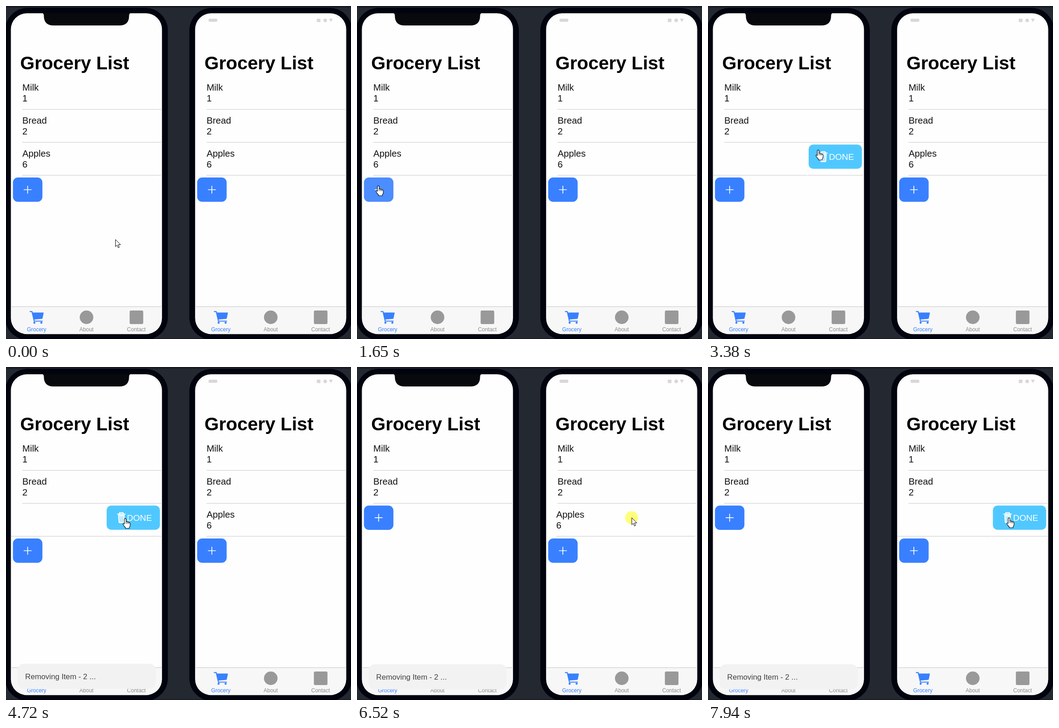
These frames come from a looping animation (761x736 px, 8000 ms). An HTML page with a canvas:

```html
<!DOCTYPE html>
<html lang="en">
<head>
<meta charset="utf-8">
<title>Grocery List</title>
<style>
html, body { margin: 0; width: 100%; height: 100%; overflow: hidden; background: #242830; }
canvas { display: block; }
</style>
</head>
<body>
<canvas id="stage" width="761" height="736"></canvas>
<script>
const ctx = document.getElementById('stage').getContext('2d');
const LOOP = 8000;
const RIGHT = 406.4;
const FONT = '"Liberation Sans", Arial, sans-serif';
const BLUE = '#3880ff', CYAN = '#50c8ff', GRAY = '#999', LINE = '#c8c7cc', PAPER = '#fefefe';
const ROW_TOP = 228, PITCH = 72.8, ADD_TOP = 379;
const OPEN = 123;
const TAP = 4150, TOAST = 4500, REMOVED = 4870;

// Pointer moves: from time, to time, goal x, goal y, bend of the path
const HOME = { x: 241, y: 516 };
const MOVES = [
  [70, 800, 88, 451, 50],
  [800, 1110, 47, 397, 0],
  [1680, 2030, 141, 318, -135],
  [2050, 2560, 220, 346, 0],
  [2660, 2910, 80, 340, 0],
  [3000, 3380, 243, 318, 0],
  [3400, 3770, 263, 334.5, 0],
  [4820, 5420, 202, 701, 0],
  [5590, 6350, 608.5, 333, 0],
  [6490, 6850, 470, 336, 0],
  [6930, 7380, 700, 316, 0],
  [7500, 7900, 664, 333, 0]
];
const DRAG_L = { press: 2610, release: 2990 };
const DRAG_R = { press: 6440, release: 6930 };

const clamp = v => Math.min(1, Math.max(0, v));
const smooth = k => k * k * (3 - 2 * k);

function pointerAt(t) {
  let { x, y } = HOME;
  for (const [from, to, gx, gy, bend] of MOVES) {
    if (t < from) break;
    const k = smooth(clamp((t - from) / (to - from)));
    x += (gx - x) * k;
    y += (gy - y) * k + bend * 4 * k * (1 - k);
  }
  return { x, y };
}

// The row follows the pointer, resists past the open width, then settles there
function swipe(t, { press, release }) {
  if (t < press) return 0;
  const pull = pointerAt(press).x - pointerAt(Math.min(t, release)).x;
  const over = Math.max(0, pull - OPEN) * 0.55;
  const settle = t > release ? Math.exp((release - t) / 60) : 1;
  return Math.min(pull, OPEN) + over * settle;
}

function over(p, x, y, w, h) {
  return p.x >= x && p.x <= x + w && p.y >= y && p.y <= y + h;
}

function rect(x, y, w, h, color) {
  ctx.fillStyle = color;
  ctx.fillRect(x, y, w, h);
}

function round(x, y, w, h, r, color) {
  ctx.beginPath();
  ctx.roundRect(x, y, w, h, r);
  ctx.fillStyle = color;
  ctx.fill();
}

function disc(x, y, r, color) {
  ctx.beginPath();
  ctx.arc(x, y, r, 0, Math.PI * 2);
  ctx.fillStyle = color;
  ctx.fill();
}

function text(str, x, y, size, color, align = 'left', weight = 'normal') {
  ctx.font = `${weight} ${size}px ${FONT}`;
  ctx.textAlign = align;
  ctx.fillStyle = color;
  ctx.fillText(str, x, y);
}

function path(d, fill, stroke, width = 1) {
  const p = new Path2D(d);
  if (fill) { ctx.fillStyle = fill; ctx.fill(p); }
  if (stroke) {
    ctx.strokeStyle = stroke;
    ctx.lineWidth = width;
    ctx.lineJoin = ctx.lineCap = 'round';
    ctx.stroke(p);
  }
}

function at(x, y, draw) {
  ctx.save();
  ctx.translate(x, y);
  draw();
  ctx.restore();
}

function row(name, count, index, shift = 0) {
  const y = ROW_TOP + index * PITCH;
  text(name, 36 - shift, y - 41, 20.3, '#111');
  text(count, 36 - shift, y - 17, 20.3, '#111');
  rect(36 - shift, y, 306, 1, LINE);
}

function trash() {
  path('M247.2 326.5H261.8L260.6 343Q260.4 345 258.5 345H250.5Q248.6 345 248.4 343Z', '#fff');
  path('M246 325H263M250.5 324.5V322H258.5V324.5', null, '#fff', 2);
  path('M251 329.5L251.6 342M254.5 329.5V342M258 329.5L257.4 342', null, CYAN, 1.2);
}

function swipeRow(shift) {
  if (shift > 4) {
    round(222, 306.3, 117.5, 53.5, 10, CYAN);
    trash();
    text('DONE', 266.7, 339.7, 19.1, '#fff');
    rect(12, ROW_TOP + 2 * PITCH, 330, 1, LINE);
  }
  rect(12, 302.5, Math.max(0, 331 - shift), 72.5, PAPER);
  row('Apples', '6', 2, shift);
}

function addButton(y, hover) {
  round(15.3, y, 65, 53.7, 11, hover ? '#4c8dff' : BLUE);
  path(`M39.7 ${y + 27}h16m-8-8v16`, null, '#fff', 1.7);
}

function cart() {
  path('M53 675.3H57.3L62.2 696.5H80', null, BLUE, 2.2);
  path('M58 677.6H82.2Q83.3 677.6 83 678.8L80.6 690.2Q80.3 691.3 79.2 691.5L61.4 693Z', BLUE);
  disc(62.6, 700, 2.3, BLUE);
  disc(78, 700, 2.3, BLUE);
}

function tabs() {
  rect(12, 664, 331, 62, '#f7f7f7');
  rect(12, 664, 331, 1, '#c4c4c6');
  cart();
  disc(177.6, 688, 15, GRAY);
  round(272.7, 673, 30, 30, 3, GRAY);
  ['Grocery', 'About', 'Contact'].forEach((name, i) =>
    text(name, 67.5 + i * 110, 718.7, 12, i ? '#8c8c8c' : BLUE, 'center'));
}

function toast(t) {
  if (t < TOAST) return;
  const q = clamp((t - TOAST) / 350) - 1;
  const ease = 1 + 1.75 * q ** 3 + 0.75 * q * q;
  const y = 657 + 70 * (1 - ease);
  round(25.5, y, 305, 55.5, 14, '#f2f2f2');
  text('Removing Item - 2 ...', 42.3, y + 33.7, 16.8, '#414141');
}

function notch() {
  path('M79 15.5Q83.5 16 83.5 21.5Q83.5 43 105 43H250Q271.5 43 271.5 21.5Q271.5 16 276 15.5Z', '#08090c');
}

function statusBar() {
  const c = '#d8d8d8';
  round(40.3, 28, 19.5, 7, 3, c);
  rect(279.2, 28, 8, 7.5, c);
  disc(297.6, 31.7, 4, c);
  path('M305.8 28H314.6L310.2 35.5Z', c);
}

function phone(x, { shift, removed, hover, toastAt = 0, top }) {
  at(x, 0, () => {
    round(-2, 4, 359, 734, 50, '#01040e');
    round(10.7, 16, 333.4, 709.3, 35.5, PAPER);
    ctx.save();
    ctx.clip();
    text('Grocery List', 31.3, 140, 40.8, '#000', 'left', 'bold');
    row('Milk', '1', 0);
    row('Bread', '2', 1);
    if (!removed) swipeRow(shift);
    addButton(ADD_TOP - (removed ? PITCH : 0), hover);

    // The app view sits in a slightly smaller rounded area
    ctx.beginPath();
    ctx.roundRect(12, 17, 330.5, 707.3, 38);
    ctx.strokeStyle = 'rgba(0,0,0,0.1)';
    ctx.lineWidth = 0.8;
    ctx.stroke();
    ctx.clip();
    tabs();
    toast(toastAt);
    ctx.restore();
    top();
  });
}

function arrow() {
  path('M.5 .5V15.8L4 12.5L6.4 18.3L8.9 17.3L6.5 11.6H11.3Z', '#fff', '#000', 1);
}

function hand() {
  path('M-1.9 2Q-1.8 .4 0 .4Q1.8 .4 1.9 2V7.3Q4 6.5 5 8.2Q7 7.5 8 9.2Q11 8.8 11 11.5V15.5Q11 17.5 9 20V22.3H.5V20.5Q-2.5 17.5-4.7 13.8Q-5.5 11.5-3.5 11.3Q-2.6 11.3-1.9 12.8Z', '#fff', '#000', 1.1);
  path('M1.9 7.5V11.5M5 8.4V11.8M8 9.4V12', null, '#000', 0.9);
}

function draw(t) {
  const p = pointerAt(t);
  const left = swipe(t, DRAG_L), right = swipe(t, DRAG_R);
  const removed = t >= REMOVED;
  const overAdd = !removed && over(p, 15, ADD_TOP, 65, 54);
  const overDone = [[0, !removed && left], [RIGHT, right]].some(([x, shift]) =>
    shift > OPEN - 5 && over(p, x + 222, 306, 118, 54));
  const pressed = [DRAG_L, DRAG_R, { press: TAP, release: TAP + 110 }]
    .some(({ press, release }) => t >= press && t < release);

  rect(0, 0, 761, 736, '#242830');
  rect(0, 0, 761, 3.5, '#181b22');
  rect(0, 734.5, 761, 2, '#171a21');
  phone(0, { shift: left, removed, hover: overAdd, toastAt: t, top: notch });
  phone(RIGHT, { shift: right, top: statusBar });
  if (pressed) disc(p.x, p.y, 14.3, 'rgba(255,255,0,0.52)');
  at(p.x, p.y, overAdd || overDone ? hand : arrow);
}

const start = performance.now();
function frame() {
  draw((performance.now() - start) % LOOP);
  requestAnimationFrame(frame);
}
frame();
</script>
</body>
</html>
```
